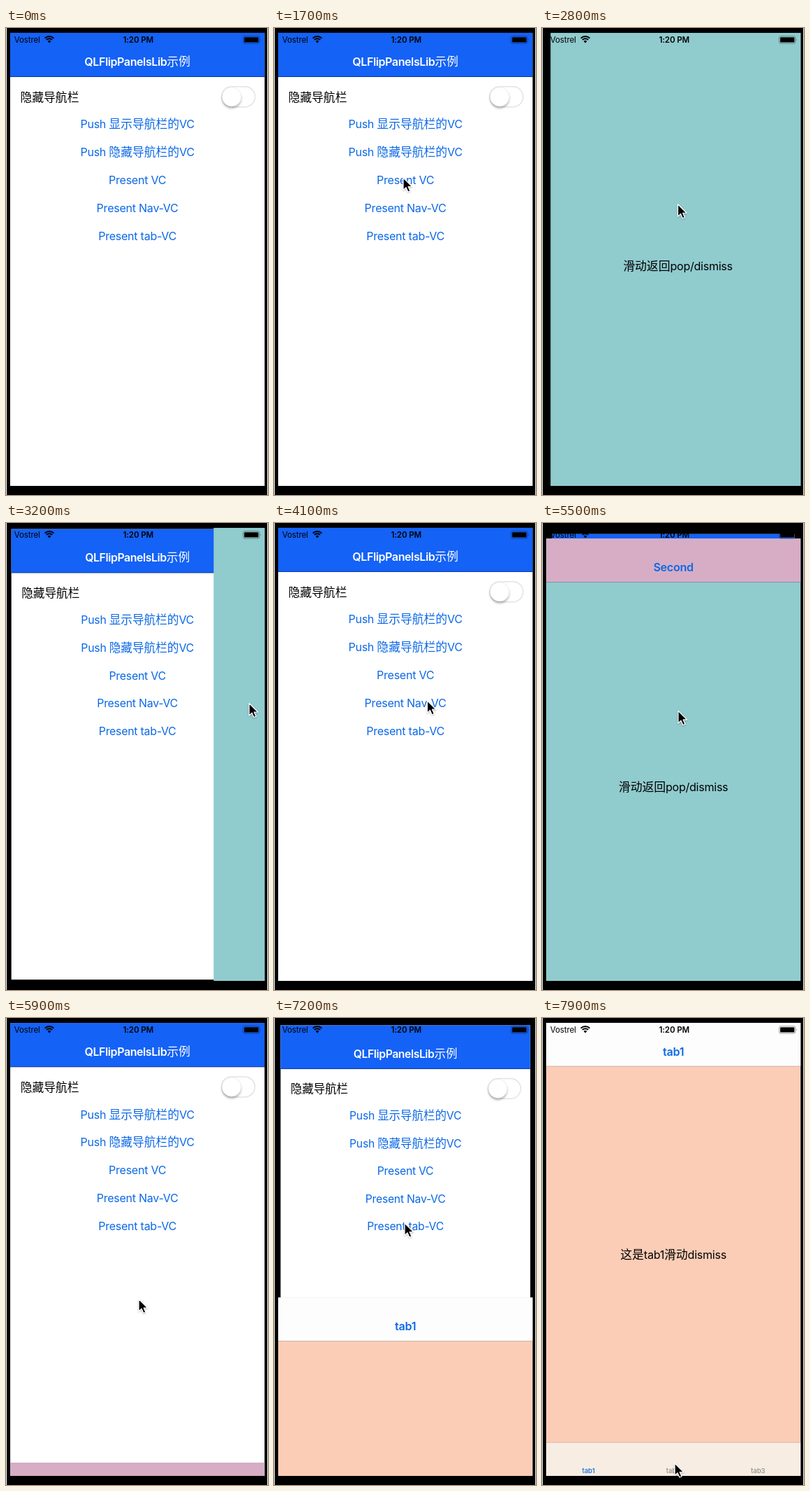
Write an HTML page that moves like this. It is 375x667 px and loops after 8000 ms.

```html
<!DOCTYPE html>
<html lang="zh-CN">
<head>
<meta charset="utf-8">
<title>Transitions</title>
<style>
html, body { margin: 0; width: 100%; height: 100%; overflow: hidden; background: #fff; }
svg { display: block; width: 100%; height: 100%; }
text { font: 16.8px Inter, "Noto Sans CJK SC", "Noto Sans CJK", sans-serif; white-space: pre; }
.latin { font-size: 16px; letter-spacing: -.23px; }
.mid { text-anchor: middle; }
.bold { font-weight: 500; }
.bold .latin, .bar.bold { font-weight: 600; }
.title .latin { letter-spacing: -.4px; }
.link { fill: #0b68e6; }
.bar { font-size: 11.5px; letter-spacing: -.1px; }
.tab { font-size: 9.5px; font-weight: 500; }
</style>
</head>
<body>
<svg viewBox="0 0 375 667">
  <defs>
    <clipPath id="screen"><rect x="5.8" y="6.8" width="364.6" height="647.2"/></clipPath>
    <filter id="soft" x="-40%" y="-40%" width="180%" height="190%">
      <feDropShadow dx="0" dy="2.8" stdDeviation="1.8" flood-color="#000" flood-opacity=".28"/>
    </filter>
    <filter id="faint" x="-40%" y="-30%" width="190%" height="180%">
      <feDropShadow dx="0" dy="1" stdDeviation="1" flood-color="#000" flood-opacity=".3"/>
    </filter>
  </defs>
  <rect x="1" width="373" height="667"/>
  <g clip-path="url(#screen)">
    <g id="home">
      <rect x="5.8" y="6.8" width="364.6" height="647.2" fill="#fff"/>
      <rect x="5.8" y="6.8" width="364.6" height="62.7" fill="#1462f6"/>
      <rect x="5.8" y="69" width="364.6" height="1" fill="#0b37a8"/>
      <rect x="308.5" y="83.7" width="48" height="29" rx="14.5" fill="#fff" stroke="#e3e3e3" stroke-width="1.5"/>
      <circle cx="323" cy="98.2" r="13.6" fill="#fff" stroke="#ddd" stroke-width=".5" filter="url(#soft)"/>
    </g>
    <g id="plain">
      <rect x="5.8" y="6.8" width="364.6" height="647.2" fill="#90cbce"/>
    </g>
    <g id="nav">
      <rect x="5.8" y="6.8" width="364.6" height="647.2" fill="#90cbce"/>
      <rect x="5.8" y="6.8" width="364.6" height="62.2" fill="#d6adc5"/>
      <rect x="5.8" y="68.6" width="364.6" height=".8" fill="#7f8a92"/>
    </g>
    <g id="tabs">
      <rect x="5.8" y="6.8" width="364.6" height="647.2" fill="#fccdb6"/>
      <rect x="5.8" y="6.8" width="364.6" height="62.2" fill="#fdfdfd"/>
      <rect x="5.8" y="68.6" width="364.6" height=".8" fill="#c4a699"/>
      <rect x="5.8" y="606" width="364.6" height="48" fill="#f8ede3"/>
      <rect x="5.8" y="605.8" width="364.6" height=".8" fill="#c9b0a2"/>
    </g>
    <g id="status">
      <path d="M62 21.4L59.6 18.8A3.5 3.5 0 0 1 64.4 18.8Z"/>
      <path d="M57.8 16.9A6 6 0 0 1 66.2 16.9M55.6 14.6A9.2 9.2 0 0 1 68.4 14.6" fill="none" stroke="#000" stroke-width="2"/>
      <rect x="339.4" y="11.7" width="23.4" height="10.4" rx="2.4" fill="none" stroke="#000" stroke-opacity=".4" stroke-width=".9"/>
      <rect x="340.9" y="13.2" width="20.4" height="7.4" rx="1.2"/>
      <path d="M363.8 15.3q1.6 1.6 0 3.2z" fill-opacity=".45"/>
    </g>
  </g>
  <g id="cursor">
    <path d="M0 0V17.4L4 13.7 6.8 20 9.9 18.8 7.1 12.5H12.6Z" stroke="#fff" stroke-width="1.2" stroke-linejoin="round" filter="url(#faint)"/>
  </g>
</svg>
<script>
const LOOP = 8000, STEP = 100, GLIDE = 245;
const SIZE = [364.6, 647.2], MID = [188.1, 330.4], INSET = 9.2;
const NS = 'http://www.w3.org/2000/svg';
const $ = id => document.getElementById(id);

// Latin and Chinese runs get their own size and tracking.
function label(parent, str, x, y, cls = '') {
  const text = document.createElementNS(NS, 'text');
  text.setAttribute('x', x);
  text.setAttribute('y', y);
  text.setAttribute('class', cls);
  if (/bar|tab/.test(cls)) text.textContent = str;
  else for (const run of str.match(/[\u4e00-\u9fff]+|[^\u4e00-\u9fff]+/g)) {
    const span = document.createElementNS(NS, 'tspan');
    if (run.charCodeAt(0) < 256) span.setAttribute('class', 'latin');
    span.textContent = run;
    text.append(span);
  }
  $(parent).append(text);
  return text;
}

const CX = MID[0];
label('home', 'QLFlipPanelsLib示例', CX, 53.6, 'mid bold title').setAttribute('fill', '#fff');
label('home', '隐藏导航栏', 20.5, 104.6);
['Push 显示导航栏的VC', 'Push 隐藏导航栏的VC', 'Present VC', 'Present Nav-VC', 'Present tab-VC']
  .forEach((s, i) => label('home', s, CX, 143.4 + i * 39.8, 'mid link'));
label('plain', '滑动返回pop/dismiss', CX, 346.4, 'mid');
label('nav', 'Second', CX, 53.2, 'mid bold link');
label('nav', '滑动返回pop/dismiss', CX, 367.4, 'mid');
label('tabs', 'tab1', CX, 53.6, 'mid bold link');
label('tabs', '这是tab1滑动dismiss', CX, 344, 'mid');
['tab1', 'tab2', 'tab3'].forEach((s, i) => {
  const t = label('tabs', s, 66.5 + i * 121.4, 650.4, 'mid tab' + (i ? '' : ' link'));
  if (i) t.setAttribute('fill', '#8e8e8e');
});
label('status', 'Vostrel', 11.8, 21, 'bar');
label('status', '1:20 PM', 189.3, 21, 'bar mid bold');

const clamp = p => Math.min(1, Math.max(0, p));
const ease = p => { p = clamp(p); return p * p * (3 - 2 * p); };
const mix = (a, b, p) => a + (b - a) * p;

// Cursor travels: start, end, destination.
const moves = [
  { from: 400, to: 1300, at: [185, 214] },
  { from: 2000, to: 2400, at: [188, 251.5] },
  { from: 2745, to: 3200, at: [348, 257.5] },
  { from: 3500, to: 4300, at: [195.5, 253] },
  { from: 5400, to: 5900, at: [190, 401.5] },
  { from: 6000, to: 7000, at: [187, 293] },
  { from: 7400, to: 7800, at: [191, 650] },
  { from: 7800, to: 7900, at: [190, 636] }
];

const pointer = t => moves.reduce(
  (pos, m) => pos.map((v, i) => mix(v, m.at[i], ease((t - m.from) / (m.to - m.from)))),
  [384, 192]);

// Each sheet rises, then may be dragged along an axis and let go.
const sheets = [
  { id: 'plain', rise: 1795, axis: 0, grab: 2700, release: 3043 },
  { id: 'nav', rise: 4395, axis: 1, grab: 5400, release: 5682 },
  { id: 'tabs', rise: 7095, axis: 1, grab: LOOP, release: LOOP }
];

function offset(s, t) {
  const pos = [0, SIZE[1] * (1 - ease((t - s.rise) / GLIDE))];
  if (t > s.grab) {
    const drag = pointer(Math.min(t, s.release))[s.axis] - pointer(s.grab)[s.axis];
    pos[s.axis] = mix(drag, SIZE[s.axis], ease((t - s.release) / GLIDE));
  }
  return pos;
}

function draw(t) {
  let cover = 0;
  for (const s of sheets) {
    const [x, y] = offset(s, t);
    const shown = (1 - x / SIZE[0]) * (1 - y / SIZE[1]);
    cover = Math.max(cover, shown);
    $(s.id).style.display = shown > 0 ? '' : 'none';
    $(s.id).setAttribute('transform', `translate(${x} ${y})`);
  }

  // The page behind shrinks by the same inset on all four sides.
  const scale = SIZE.map(v => 1 - 2 * INSET * cover / v);
  const shift = MID.map((v, i) => v * (1 - scale[i]));
  $('home').setAttribute('transform', `translate(${shift}) scale(${scale})`);

  $('cursor').style.display = t < 500 ? 'none' : '';
  $('cursor').setAttribute('transform', `translate(${pointer(t)})`);
}

const start = performance.now();
function tick() {
  const t = (performance.now() - start) % LOOP;
  draw(Math.floor(t / STEP) * STEP);
  requestAnimationFrame(tick);
}
tick();
</script>
</body>
</html>
```
